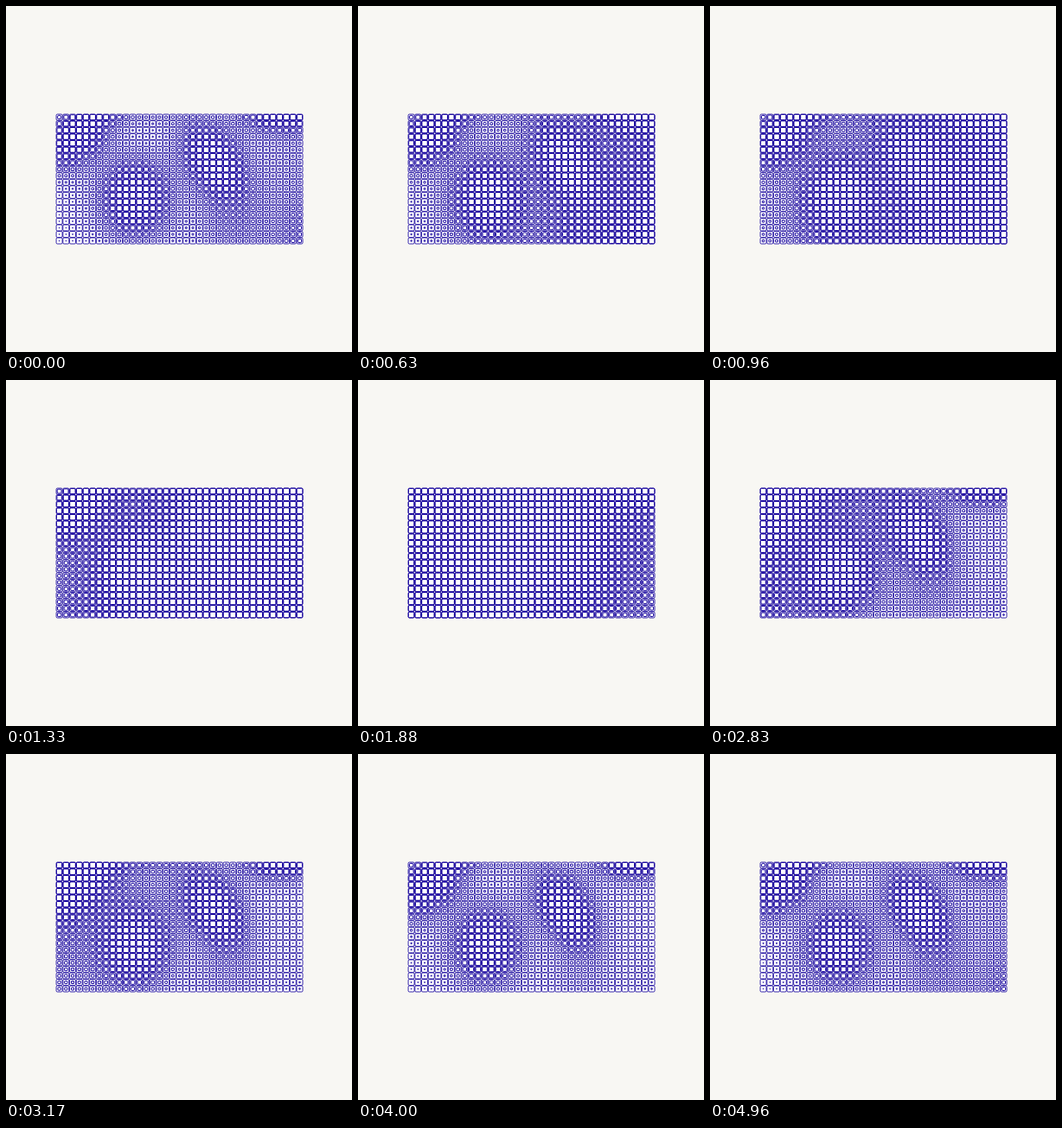
Write an HTML page with a canvas that moves like this. It is 400 px wide and 400 px high and loops after 5000 ms.

```html
<!DOCTYPE html>
<html lang="en">
<head>
<meta charset="utf-8">
<title>Pulsing grid</title>
<style>
  html, body { margin: 0; width: 100%; height: 100%; overflow: hidden; background: #f8f7f3; }
  canvas { display: block; width: 400px; height: 400px; }
</style>
</head>
<body>
<canvas id="stage"></canvas>
<script>
const LOOP = 5000;
const COLS = 37, ROWS = 20;
const LEFT = 61.6, TOP = 128.6, STEP_X = 7.72, STEP_Y = 7.52;
const CELL = 7;
const INK = '#14009c';

// Raised islands: centre, half axes, tilt, height
const islands = [
  { x: 83, y: 148, rx: 58, ry: 35, tilt: -0.8, h: 0.84 },
  { x: 149, y: 222, rx: 47, ry: 53, tilt: 0, h: 0.86 },
  { x: 238, y: 175, rx: 52, ry: 36, tilt: 0.95, h: 0.84 },
  { x: 319, y: 122, rx: 52, ry: 27, tilt: 0, h: 0.86 },
  { x: 160, y: 118, rx: 62, ry: 19, tilt: 0, h: 0.35 },
  { x: 258, y: 240, rx: 38, ry: 48, tilt: 0, h: 0.3 },
  { x: 342, y: 262, rx: 26, ry: 40, tilt: 0, h: 0.12 }
];

function height(x, y) {
  let sum = 0.09;
  for (const i of islands) {
    const c = Math.cos(i.tilt), s = Math.sin(i.tilt);
    const dx = x - i.x, dy = y - i.y;
    const u = (dx * c + dy * s) / i.rx;
    const v = (dy * c - dx * s) / i.ry;
    sum += i.h * Math.exp(-Math.pow(u * u + v * v, 1.3));
  }
  return Math.min(sum, 0.92);
}

const cells = [];
for (let row = 0; row < ROWS; row++) {
  for (let col = 0; col < COLS; col++) {
    const x = LEFT + col * STEP_X, y = TOP + row * STEP_Y;
    // The pulse starts at the lower right and travels to the upper left
    const peak = 930 + 4.4 * (339.5 - x) + 2.5 * (271.5 - y);
    cells.push({ x, y, peak, base: height(x, y) });
  }
}

const canvas = document.getElementById('stage');
const ctx = canvas.getContext('2d');
const ratio = window.devicePixelRatio || 1;
canvas.width = canvas.height = 400 * ratio;
ctx.scale(ratio, ratio);

function addSquare(path, x, y, size, radius) {
  path.roundRect(x - size / 2, y - size / 2, size, size, radius);
}

const frames = new Path2D();
for (const c of cells) addSquare(frames, c.x, c.y, CELL, 1.3);

function draw(time) {
  ctx.fillStyle = '#f8f7f3';
  ctx.fillRect(0, 0, 400, 400);
  ctx.fillStyle = '#fff';
  ctx.fill(frames);

  const inner = new Path2D();
  for (const c of cells) {
    const wave = (1 + Math.cos((time - c.peak) / LOOP * 2 * Math.PI)) / 2;
    const scale = c.base + (1 - c.base) * wave * wave;
    addSquare(inner, c.x, c.y, CELL * scale, 1.3 * scale);
  }
  ctx.strokeStyle = INK;
  ctx.lineWidth = 0.85;
  ctx.stroke(frames);
  ctx.lineWidth = 1;
  ctx.stroke(inner);
}

const start = performance.now();
function tick() {
  draw((performance.now() - start) % LOOP);
  requestAnimationFrame(tick);
}
tick();
</script>
</body>
</html>
```
